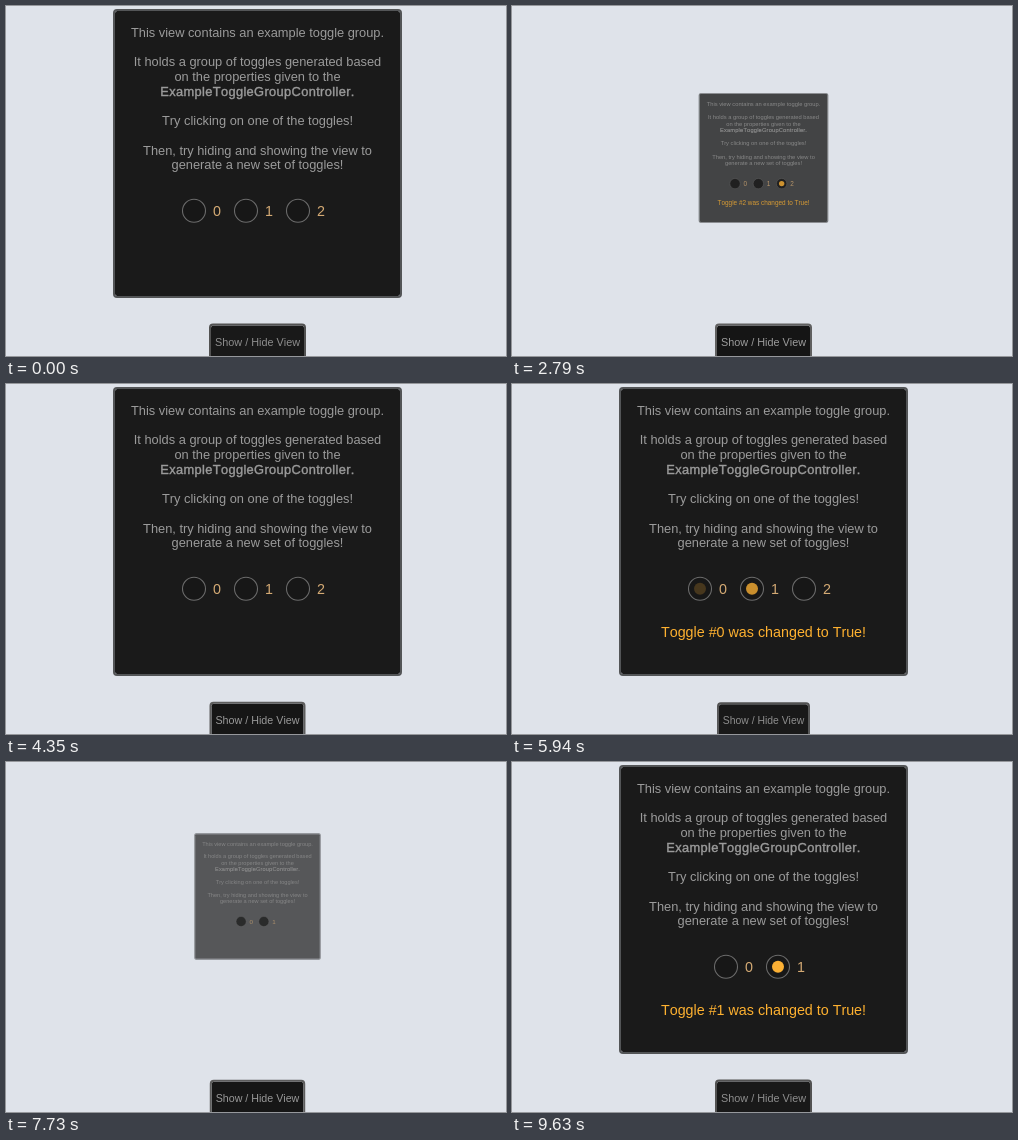
An HTML page with a canvas for the animation above (9.86 s loop, 500x350 px).

```html
<!DOCTYPE html>
<html lang="en">
<head>
<meta charset="utf-8">
<title>Toggle group</title>
<style>
  html, body { margin: 0; height: 100%; overflow: hidden; background: #dfe3ea; }
  canvas { display: block; }
</style>
</head>
<body>
<canvas id="stage" width="500" height="350"></canvas>
<script>
const ctx = document.getElementById('stage').getContext('2d');
const LOOP = 9860, CX = 251.5, CY = 147.5;
const FONT = '"Liberation Sans", Arial, sans-serif';

const LINES = [
  'This view contains an example toggle group.', '',
  'It holds a group of toggles generated based',
  'on the properties given to the',
  '*ExampleToggleGroupController.', '',
  'Try clicking on one of the toggles!', '',
  'Then, try hiding and showing the view to',
  'generate a new set of toggles!'
];

// Each showing of the view: toggle count, show/hide start, clicks as [time, toggle]
const VIEWS = [
  { count: 3, show: -1000, hide: 2497, clicks: [[480, 0], [1200, 1], [1820, 2]] },
  { count: 3, show: 3749, hide: 6482, clicks: [[5150, 1], [5940, 0]] },
  { count: 2, show: 7503, hide: 99999, clicks: [[8390, 0], [9030, 1]] }
];

const clamp = x => Math.min(1, Math.max(0, x));
const mix = (a, b, p) => a + (b - a) * p;
const ramp = (t, start, length) => clamp((t - start) / length);
const smooth = p => p * p * (3 - 2 * p);

function text(str, x, y, size, color, spacing = 0) {
  ctx.font = size + 'px ' + FONT;
  ctx.letterSpacing = spacing + 'px';
  ctx.fillStyle = color;
  ctx.fillText(str, x, y);
}

// Border and fill do not overlap, so a fading box keeps an even tone
function box(x, y, w, h, fill, border) {
  ctx.beginPath();
  ctx.roundRect(x + 2, y + 2, w - 4, h - 4, 2.5);
  ctx.fillStyle = fill;
  ctx.fill();
  ctx.roundRect(x, y, w, h, 4);
  ctx.fillStyle = border;
  ctx.fill('evenodd');
}

function disc(x, y, r, color) {
  ctx.beginPath();
  ctx.arc(x, y, r, 0, 2 * Math.PI);
  ctx.fillStyle = color;
  ctx.fill();
}

function centered(x, y, scale, draw) {
  ctx.save();
  ctx.translate(x, y);
  ctx.scale(scale, scale);
  draw();
  ctx.restore();
}

// Drops in small from above then grows; shrinks then sinks away
function pose(view, t) {
  if (t >= view.hide) {
    const p = smooth(ramp(t, view.hide, 160));
    const v = ramp(t, view.hide + 160, 290) ** 2;
    return { scale: mix(1, .473, p) - .115 * v, dy: -3 * p + 35 * v, alpha: 1 - v };
  }
  const alpha = ramp(t, view.show, 258) ** 3, v = 1 - alpha;
  const grow = ramp(t, view.show + 258, 172);
  return {
    scale: mix(1, .473, (1 - grow) ** 3) - .115 * v,
    dy: -4 * (1 - grow) - 94 * v * v,
    alpha
  };
}

function drawToggles(view, t) {
  const done = view.clicks.filter(c => t >= c[0]);
  const [now, before] = done.reverse();
  const fade = now ? clamp((t - now[0] + 20) / 100) : 0;
  const base = ctx.globalAlpha;
  for (let i = 0; i < view.count; i++) {
    const x = (i - view.count / 2) * 52 + 14.5, y = 57.2;
    disc(x, y, 11.5, '#171717');
    ctx.strokeStyle = '#6c6c6c';
    ctx.lineWidth = 1.1;
    ctx.stroke();
    const on = now && now[1] === i ? fade : before && before[1] === i ? 1 - fade : 0;
    ctx.globalAlpha = base * on;
    disc(x, y, 6, '#fbb034');
    ctx.globalAlpha = base;
    text(i, x + 23, 62.5, 14.3, '#d4aa74');
  }
  if (now) text(`Toggle #${now[1]} was changed to True!`, 0, 105.5, 14.3, '#feb130');
}

function drawView(t) {
  const view = VIEWS.filter(v => t >= v.show).pop();
  const { scale, dy, alpha } = pose(view, t);
  if (alpha <= 0) return;
  ctx.globalAlpha = alpha;
  centered(CX, CY + dy, scale, () => {
    box(-144.5, -144.5, 289, 289, '#1a1a1a', '#535557');
    LINES.forEach((line, i) => {
      const y = 31 - CY + i * 14.71, bold = line[0] === '*';
      if (!bold) return text(line, 0, y, 12.83, '#9b9b9b');
      const str = line.slice(1);
      text(str, 0, y, 12.83, '#9b9b9b', .36);
      ctx.strokeStyle = '#9b9b9b';
      ctx.lineWidth = .4;
      ctx.strokeText(str, 0, y);
    });
    drawToggles(view, t);
  });
  ctx.globalAlpha = 1;
}

function drawButton(t) {
  // 1 = hovered or selected, 0 = resting
  let size = 1;
  for (const [rest, hover] of [[430, 2000], [5050, 6380], [8310, 9530]])
    if (t >= rest) size = 1 - ramp(t, rest, 110) + ramp(t, hover, 100);
  for (const leave of [4320, 7680])
    size -= Math.sin(Math.PI * ramp(t, leave, 210)) * .55;
  const dark = ramp(t, 2500, 100) - ramp(t, 4320, 210) + ramp(t, 6480, 100) - ramp(t, 7680, 210);
  const gray = (a, b) => `rgb(${Array(3).fill(Math.round(mix(a, b, dark)))})`;
  centered(CX, 336, mix(.958, 1, size), () => {
    box(-48.5, -18.5, 97, 37, gray(25, 21), gray(82, 96));
    text('Show / Hide View', 0, 3.9, 10.85, gray(142, 156));
  });
}

function frame(now) {
  const t = now % LOOP;
  ctx.fillStyle = '#dfe3ea';
  ctx.fillRect(0, 0, 500, 350);
  drawView(t);
  drawButton(t);
  requestAnimationFrame(frame);
}

ctx.textAlign = 'center';
ctx.fontKerning = 'none';
requestAnimationFrame(frame);
</script>
</body>
</html>
```
